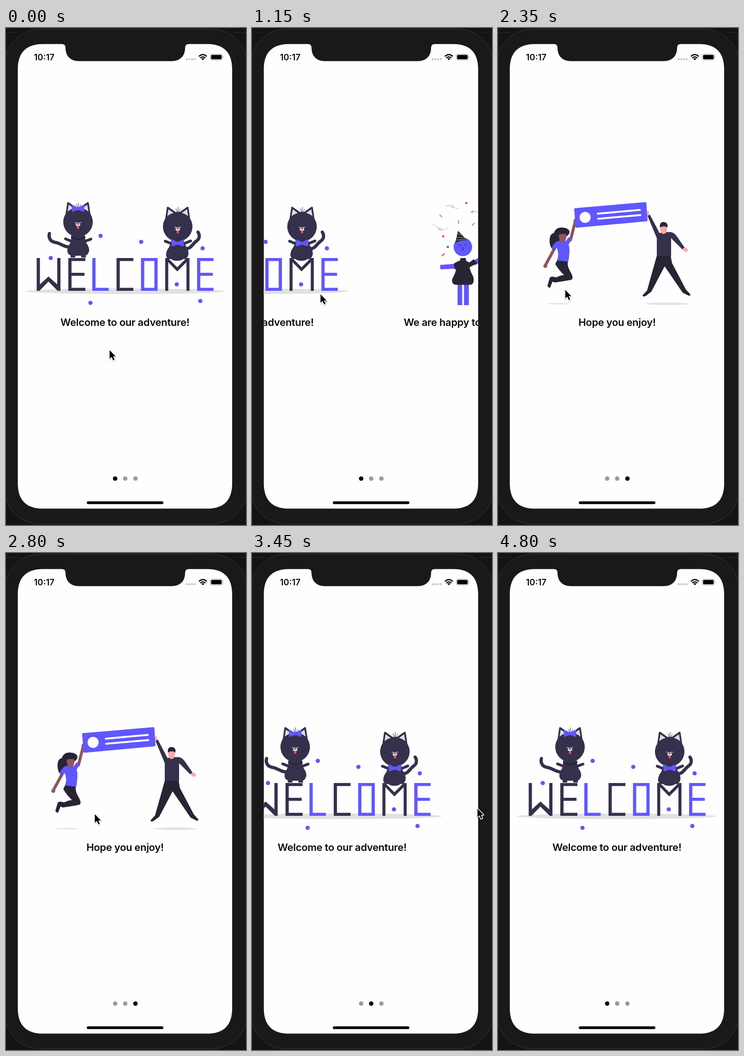
Write an HTML page that moves like this. It is 520 px wide and 1076 px high and loops after 4.85 s.

```html
<!DOCTYPE html>
<html lang="en">
<head>
<meta charset="utf-8">
<title>Onboarding pager</title>
<style>
  html, body { margin: 0; width: 100%; height: 100%; overflow: hidden; background: #141417; }
  svg { display: block; width: 520px; height: 1076px; }
  text { font-family: Inter, "Liberation Sans", sans-serif; font-weight: 600; fill: #0b0a0c; }
  .title { font-size: 22px; letter-spacing: -.32px; }
  .ink { fill: #35304b; }
  .dark { fill: #272534; }
  .blue { fill: #6057ff; }
  .red { fill: #f04d63; }
  .gray { fill: #a9a8ad; }
  .shade { fill: #e1e0e2; }
  .skin { fill: #8d5660; }
  .pink { fill: #fba7ab; }
  .line { fill: none; stroke-linecap: round; stroke-linejoin: round; }
</style>
</head>
<body>
<svg viewBox="0 0 520 1076" xmlns="http://www.w3.org/2000/svg">
  <defs>
    <clipPath id="screen"><rect x="25.500" y="35" width="464.500" height="1006"/></clipPath>
    <g id="head">
      <g stroke="#35304b" stroke-width="4" stroke-linejoin="round" fill="#dddce0">
        <path d="M-25-17L-21.500-41L-3-28Z"/>
        <path d="M25-17L21.500-41L3-28Z"/>
      </g>
      <path class="line" d="M-1-30Q-1-36-4-39M1-30Q0-36 1-42M3-30Q3-35 6-38" stroke="#35304b" stroke-width="1"/>
      <circle class="ink" r="32"/>
      <path d="M-22.500-23L-20-37L-9-29.500Q-16-28-22.500-23ZM22.500-23L20-37L9-29.500Q16-28 22.500-23Z" fill="#dddce0"/>
      <path class="line" d="M-7 1.500q2-2 4 0M3 1.500q2-2 4 0" stroke="#fff" stroke-width="1"/>
      <path d="M-2.500 8h5v4q0 3-2.500 3t-2.500-3z" class="red"/>
      <path d="M-5 6.500q0-5 5-5t5 5q-1 3-5 2q-4 1-5-2z" fill="#d8d7dc"/>
      <ellipse class="ink" cy="4" rx="2" ry="1.300"/>
    </g>
    <path id="bow" class="blue" d="M-14-7Q-12-9-3-3H3Q12-9 14-7L13 7Q11 8 3 4H-3Q-11 8-13 7Z"/>
  </defs>

  <rect width="520" height="1076" fill="#141417"/>
  <path d="M0 9.500H26M494 9.500H520" stroke="#29292c"/>
  <rect x="-2.500" y="2.500" width="525" height="1071" rx="76" fill="#1a181b" stroke="#38373a"/>
  <path d="M144 .5H411" stroke="#17202d"/>
  <path fill="#fffefe" d="M80 34.700H121Q129 34.700 129 43C129 61 140 71.700 158 71.700H359C377 71.700 388 61 388 43Q388 34.700 396 34.700H436C472 34.700 490 53 490 89V986C490 1022 472 1040.600 436 1040.600H80C44 1040.600 25.600 1022 25.600 986V89C25.600 53 44 34.700 80 34.700Z"/>

  <text x="60.500" y="69.700" font-size="18.500">10:17</text>
  <g fill="#c5c4c8">
    <circle cx="391.500" cy="67.500" r="2.200"/><circle cx="397.300" cy="67.500" r="2.200"/>
    <circle cx="403.100" cy="67.500" r="2.200"/><circle cx="408.900" cy="67.500" r="2.200"/>
  </g>
  <g fill="none" stroke="#000" stroke-width="2.600">
    <path d="M418 61.500Q426.500 53.500 435 61.500M421 65Q426.500 60 432 65"/>
    <path d="M423.300 66.600Q426.500 64 429.700 66.600L426.500 69.800Z" fill="#000" stroke="none"/>
  </g>
  <rect x="442.500" y="56.500" width="26.500" height="13" rx="4" fill="none" stroke="#9c9b9f"/>
  <rect x="444.300" y="58.300" width="23" height="9.400" rx="2.300"/>
  <path d="M470.500 60.800q2 2.200 0 4.400z" fill="#9c9b9f"/>

  <g clip-path="url(#screen)">
    <g id="page0">
      <ellipse class="shade" cx="257.500" cy="570" rx="215.500" ry="6"/>
      <path class="ink" d="M66.500 498h7v57l18.500-17 19 17v-57h7v71h-6l-20-20-19.500 20h-6zM135 498h37v6.500h-30v25.500h28v6.500h-28v26h30v6.500h-37zM239.500 498h36.500v6.500h-29.500v58h29.500v6.500h-36.500zM345 498h6l20 20 20-20h6.500v71h-6.500v-62l-20 20-19.500-20v62h-6.500z"/>
      <path class="blue" fill-rule="evenodd" d="M187 498h7v64.500h28.500v6.500h-35.500zM292.500 498h36v71h-36zM299.500 504.500v58h22v-58zM414 498h35.500v6.500h-28.500v25.500h27v6.500h-27v26h28.500v6.500h-35.500z"/>
      <g class="line" stroke="#35304b" stroke-width="7">
        <path d="M137 474C124 474 119 466 106 464C95 462 92 453 94 445"/>
        <path d="M129 456.500L145 463M184 457L168 463M345 461.500L361 468M400 461L383 468" stroke-width="6"/>
        <path d="M390 478C401 478 405 466 413 461C420 456 420 448 416 442"/>
      </g>
      <path class="ink" d="M141 449H171Q171 463 177 470Q183 481 178 488Q176 492 173 492V497H163V493H150V497H140V492Q133 490 133 482Q133 475 138 468Q142 460 141 449Z"/>
      <path class="ink" d="M358 456H386Q385 466 391 474Q398 486 394 494Q390 502 384 500Q380 504 371 504Q361 504 358 500Q349 502 347 493Q346 484 353 475Q358 465 358 456Z"/>
      <path class="line" d="M142 453Q156 462 171 453" stroke="#282437" stroke-width="3"/>
      <use href="#head" x="156" y="420"/>
      <use href="#bow" x="156" y="390.500"/>
      <use href="#head" x="372" y="430"/>
      <use href="#bow" x="372" y="465.500"/>
      <g id="beads" class="blue"></g>
      <text class="title" x="118" y="645">Welcome to our adventure!</text>
    </g>

    <g id="page1">
      <g transform="translate(-203)">
        <path class="line" d="M422 387q8-6 14-1t14 5M393 426q7 0 12 6t13 5t9-6M433 386q5-4 6 0t-5 2M406 434q6-4 7 1t-6 1M476 400q8-7 14-1t13-3M499 440q7-6 12-1t15-3" stroke="#c2c1c6" stroke-width="1.200"/>
        <g id="confetti"></g>
        <path class="blue" d="M448 553h10v47h-10zM462 553h10.500v47h-10.500z"/>
        <path class="blue" d="M410 513L444 510.500V521L411 522.500ZM480 505L511 488L516 497L485 514Z"/>
        <path class="dark" d="M454 498H466V503L473 508L483 500.500L491 509L474 518Q476 528 482 538Q486 556 474 556H446Q433 556 437 542Q443 532 445 522L442 523L440 510Q448 505 454 503Z"/>
        <circle class="blue" cx="459.500" cy="474" r="20"/>
        <path class="dark" d="M449 439L469 460Q455 459 443 465Z"/>
        <path class="line" d="M448 446L456 447M446 453L463 454M445 459L466 458" stroke="#aaa8b0" stroke-width="1"/>
        <path class="line" d="M451 469q3 3 6 0M463 469q3 2 5-1M461 475q-4 1-3 3t3 1q-3 2 0 3" stroke="#272534" stroke-width="1"/>
      </g>
      <text class="title" x="128.500" y="645">We are happy to see you!</text>
    </g>

    <g id="page2">
      <ellipse class="shade" cx="132" cy="597" rx="25" ry="1.400"/>
      <ellipse class="shade" cx="367" cy="597" rx="47" ry="2.600"/>
      <path class="line" d="M157 459L167 420M122 478L104 511" stroke="#8d5660" stroke-width="6.500"/>
      <circle class="skin" cx="102.500" cy="515" r="4.300"/>
      <ellipse class="skin" cx="168" cy="418" rx="4.500" ry="5.500"/>
      <path class="blue" d="M167 390L319 377Q321 377 321.500 379L324 416Q324 418 322 418.500L170 432.500Q168 432.500 168 430L165 392Q165 390 167 390Z"/>
      <circle cx="188.700" cy="410" r="12" fill="#fffefe"/>
      <path class="line" d="M216 402L307.500 393.700M217 413L308.500 405" stroke="#fffefe" stroke-width="4"/>
      <path class="dark" d="M121 444Q110 446 112 466Q114 479 122 480Q130 476 132 462L150 450Q157 444 154 438Q149 432 139 432Q125 431 121 444Z"/>
      <path class="blue" d="M127 462L134 460Q139 467 146 462L153 453L160 457L153 469Q157 480 152 507L128 503Q133 488 127 476L124 480L116 477Q119 468 127 462Z"/>
      <path class="skin" d="M131 448Q140 444 148 447V454Q146 460 145 463Q141 468 134 461Z"/>
      <path class="dark" d="M128 503L151 506Q150 517 157 528Q165 542 159 545Q145 548 123 551L118 549L113 562Q109 563 107 558L112 541Q115 536 126 540Q136 535 143 535Q130 522 124 511Z"/>

      <path class="pink" d="M322 398L326 396L328 406L324 409ZM398 478L404 475Q411 476 411.500 481Q410 485 406 485Z"/>
      <path class="ink" d="M324 407L329 404L350 444L358 442H370Q378 440 386 449L404 475L399 479L375 455V494H344V455Z"/>
      <path class="dark" d="M344 493H374L377 509L407 566L417 577Q416 581 412 579L400 573L361 516L332 571L320 580Q314 583 313 579L323 568Z"/>
      <path class="pink" d="M351 428H366V438Q364 447 357 446Q351 443 351 428Z"/>
      <path class="dark" d="M351 432Q349 420 359 420Q369 421 367 432Q362 428 355 430Z"/>
      <text class="title" x="174.200" y="645">Hope you enjoy!</text>
    </g>
  </g>

  <g id="dots">
    <circle cx="236.500" cy="975.500" r="4.800"/>
    <circle cx="258.300" cy="975.500" r="4.800"/>
    <circle cx="280.400" cy="975.500" r="4.800"/>
  </g>
  <rect x="175" y="1024.800" width="166" height="6" rx="3"/>

  <g id="cursor" stroke-linejoin="round">
    <path d="M0 2V21L4.700 17L8.200 24.500L11.500 23L8.200 16H14Z" stroke="#000" stroke-width="4" opacity=".12"/>
    <path d="M.5 .5V19L4.900 15L8.200 22.600L11.200 21.300L8 13.900H13.500Z" stroke="#fff" stroke-width="3" paint-order="stroke"/>
  </g>
</svg>
<script>
const LOOP = 4850, WIDTH = 464, DRAG = 120, TAU = 77;
const $ = id => document.getElementById(id);
const pages = [0, 1, 2].map(i => $("page" + i));
const dots = [...$("dots").children];

$("beads").innerHTML = [[205, 450], [293, 463], [426, 477], [97, 498], [183, 595], [421, 591], [370, 555]]
  .map(([x, y]) => `<circle cx="${x}" cy="${y}" r="4.6"/>`).join("");

const rounds = [[467, 379, "red"], [417, 451, "red"], [480, 398, "gray"], [427, 474, "blue"], [507, 452, "red"]];
const strips = [[412, 407, -45, "gray"], [450, 420, 0, "gray"], [482, 425, 45, "gray"], [417, 491, 45, "red"], [516, 420, -30, "red"]];
$("confetti").innerHTML =
  rounds.map(([x, y, c]) => `<circle class="${c}" cx="${x}" cy="${y}" r="2.5"/>`).join("") +
  strips.map(([x, y, a, c]) =>
    `<rect class="${c}" x="-1.3" y="-4" width="2.6" height="8" transform="translate(${x} ${y}) rotate(${a})"/>`).join("");

// Pointer stops: time, x, y
const stops = [
  [50, 224, 697], [100, 235, 697], [250, 235, 697], [700, 378, 580], [980, 378, 577],
  [1150, 148, 576], [1250, 118, 576], [1540, 380, 577], [1600, 380, 577], [1800, 107, 571],
  [2100, 98, 568], [2600, 192, 565], [2805, 192, 565], [3000, 420, 560], [3060, 420, 558],
  [3210, 215, 556], [3450, 488, 553], [3500, 488, 552], [3690, 284, 542], [3720, 284, 542],
  [3900, 447, 540], [4040, 470, 540], [4100, 470, 538], [4380, 455, 4]
];

function pointer(t) {
  const i = stops.findIndex(s => s[0] > t);
  if (i === 0) return stops[0].slice(1);
  if (i < 0) return stops[stops.length - 1].slice(1);
  const [a, b] = [stops[i - 1], stops[i]];
  const u = (t - a[0]) / (b[0] - a[0]), k = u * u * (3 - 2 * u);
  return [1, 2].map(n => a[n] + (b[n] - a[n]) * k);
}

// One page turn: accelerating drag, then exponential settling
function swipe(t, start) {
  const d = t - start;
  if (d <= 0) return 0;
  return d < DRAG ? .36 * (d / DRAG) ** 2 : 1 - .64 * Math.exp((DRAG - d) / TAU);
}

// Rubber band past the first page
function stretch(t) {
  if (t < 3720) return 0;
  const pull = pointer(Math.min(t, 4040))[0] - 284;
  const band = WIDTH * (1 - 1 / (pull * .55 / WIDTH + 1));
  return band * Math.exp(-Math.max(0, t - 4040) / TAU);
}

function draw(t) {
  const at = swipe(t, 1000.7) + swipe(t, 1600) - swipe(t, 2805) - swipe(t, 3210.5);
  const shift = stretch(t) - at * WIDTH;
  pages.forEach((p, i) => p.setAttribute("transform", `translate(${(shift + i * WIDTH).toFixed(2)})`));

  const active = t < 1480 ? 0 : t < 2150 ? 1 : t < 3180 ? 2 : t < 3700 ? 1 : 0;
  dots.forEach((d, i) => d.setAttribute("fill", i === active ? "#000" : "#9b9a9e"));

  const [x, y] = pointer(t);
  $("cursor").setAttribute("transform", `translate(${x.toFixed(2)} ${y.toFixed(2)})`);
  $("cursor").setAttribute("visibility", t < 4400 ? "visible" : "hidden");
}

const begin = performance.now();
function tick() {
  draw((performance.now() - begin) % LOOP);
  requestAnimationFrame(tick);
}
tick();
</script>
</body>
</html>
```
